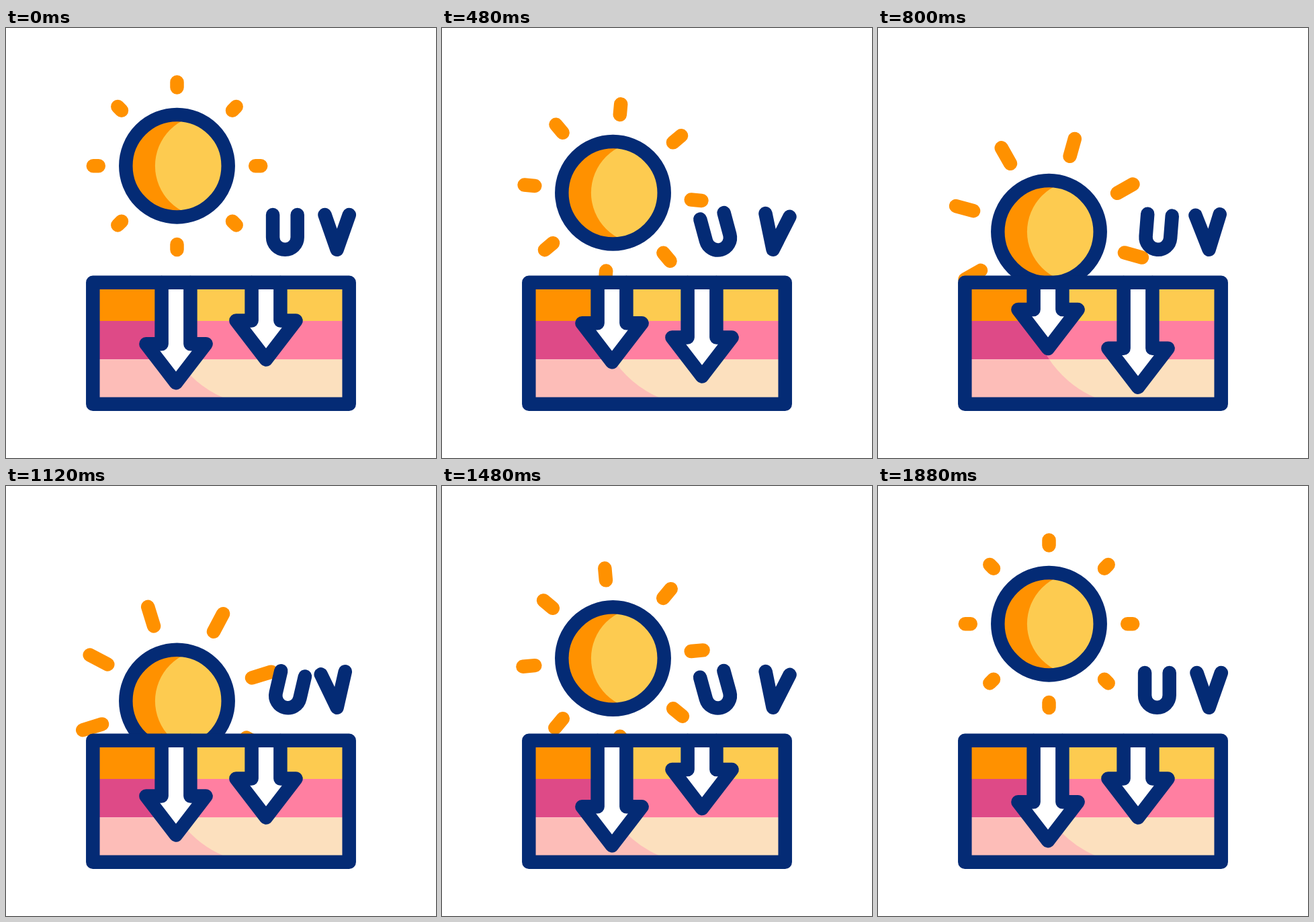
Recreate the animation shown at these times as an HTML page. Size 640 by 640 pixels, loop 2 s.

```html
<!DOCTYPE html>
<html lang="en">
<head>
<meta charset="utf-8">
<title>UV skin penetration</title>
<style>
  html, body { margin: 0; width: 100%; height: 100%; overflow: hidden; background: #fff; }
  svg { display: block; width: 100vw; height: 100vh; }
  .line { fill: none; stroke: #042b75; stroke-width: 20.5; stroke-linecap: round; stroke-linejoin: round; }
  .arrow { fill: #fff; }
  #rays { stroke: #ff9100; stroke-width: 20.5; stroke-linecap: round; }
</style>
</head>
<body>
<svg viewBox="0 0 640 640">
  <defs>
    <clipPath id="disc"><circle r="76"/></clipPath>
    <clipPath id="lit"><path d="M228 379V404A158 158 0 0 0 322 549.5V560H511V379Z"/></clipPath>
  </defs>
  <g id="sun">
    <path id="rays"/>
    <circle r="76" fill="#ff9100"/>
    <circle cx="43.4" r="76" fill="#fdcb50" clip-path="url(#disc)"/>
    <circle class="line" r="76.2"/>
  </g>
  <g>
    <path fill="#ff9100" d="M129 379H511V436H129Z"/>
    <path fill="#de4a87" d="M129 436H511V493.3H129Z"/>
    <path fill="#fdbdb8" d="M129 493.3H511V560H129Z"/>
  </g>
  <g clip-path="url(#lit)">
    <path fill="#fdcb50" d="M129 379H511V436H129Z"/>
    <path fill="#ff7fa1" d="M129 436H511V493.3H129Z"/>
    <path fill="#fce0be" d="M129 493.3H511V560H129Z"/>
  </g>
  <path class="line arrow" id="deepArrow"/>
  <path class="line arrow" id="shallowArrow"/>
  <rect class="line" x="129.3" y="378.7" width="381.4" height="181"/>
  <path class="line" id="letterU" d="M397.1 278V311.5a18.3 18.3 0 0 0 36.6 0V278"/>
  <path class="line" id="letterV" d="M474.5 278L492.6 329.8L510.8 278"/>
</svg>
<script>
const LOOP = 2000, STEP = 40;
const el = id => document.getElementById(id);

// Keyframes are [time, value] pairs, eased in and out between neighbours.
function track(keys, t) {
  if (t <= keys[0][0]) return keys[0][1];
  for (let i = 1; i < keys.length; i++) {
    const [t0, a] = keys[i - 1], [t1, b] = keys[i];
    if (t <= t1) {
      const u = (t - t0) / (t1 - t0);
      return a + (b - a) * u * u * (3 - 2 * u);
    }
  }
  return keys[keys.length - 1][1];
}

const sunset = [[120, 0], [1040, 1], [1850, 0]];
const spin = [[120, 0], [1845, 45]];
const deep = [[120, 0], [760, -52], [1320, 9.2], [1845, 0]];
const shallow = [[120, 0], [760, 42], [1320, -17.4], [1845, 0]];
const swing = [[145, 0], [485, -15.1], [1025, 16.4], [1500, -15.5], [1850, 0]];

function rays(outer, turn) {
  let d = '';
  for (let i = 0; i < 8; i++) {
    const a = (i * 45 + turn) * Math.PI / 180;
    const at = r => `${r * Math.cos(a)} ${r * Math.sin(a)}`;
    d += `M${at(116.7)}L${at(outer)}`;
  }
  return d;
}

const arrow = (x, y) =>
  `M${x - 21.4} 379V${y}H${x - 44.6}L${x} ${y + 58}L${x + 44.6} ${y}H${x + 21.4}V379`;

function draw(t) {
  const low = track(sunset, t), tilt = track(swing, t);
  el('sun').setAttribute('transform', `translate(254.5 ${205.2 + 118 * low})`);
  el('rays').setAttribute('d', rays(124.7 + 22.7 * low, track(spin, t)));
  el('deepArrow').setAttribute('d', arrow(253, 470.2 + track(deep, t)));
  el('shallowArrow').setAttribute('d', arrow(387, 435.6 + track(shallow, t)));
  el('letterU').setAttribute('transform', `rotate(${tilt} 415.4 329.8)`);
  el('letterV').setAttribute('transform', `rotate(${-tilt / 2} 492.6 329.8)`);
}

const start = performance.now();
function tick() {
  const t = (performance.now() - start) % LOOP;
  draw(Math.floor(t / STEP) * STEP);
  requestAnimationFrame(tick);
}
tick();
</script>
</body>
</html>
```
